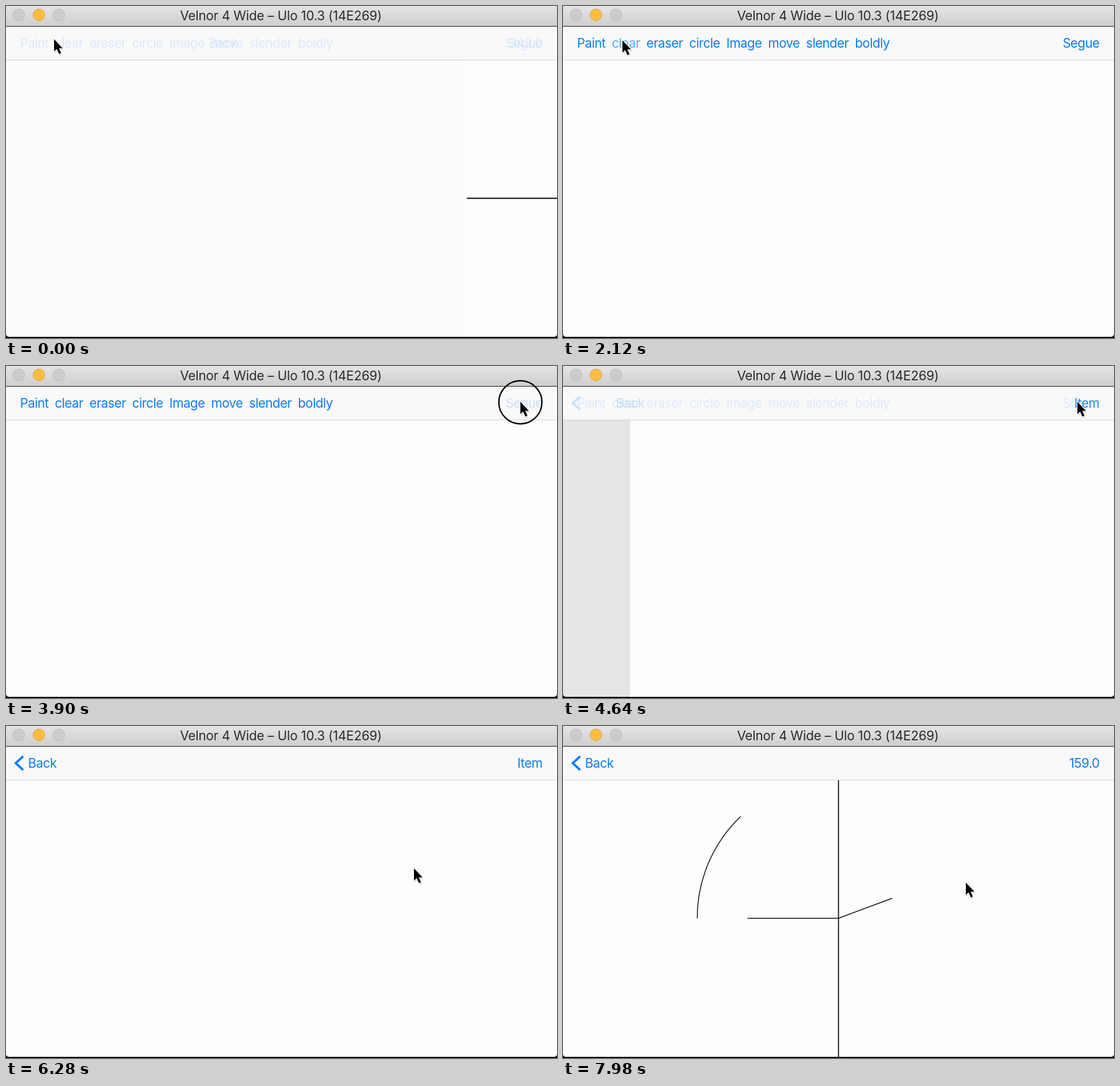
Write an HTML page that moves like this. It is 963 px wide and 581 px high and loops after 8000 ms.

```html
<!DOCTYPE html>
<html lang="en">
<head>
<meta charset="utf-8">
<title>Drawing app in a simulator</title>
<style>
  html, body { margin: 0; width: 100%; height: 100%; overflow: hidden; background: #000; }
  svg { display: block; width: 100vw; height: 100vh; }
  text { font: 22.3px Inter, Roboto, sans-serif; letter-spacing: -.56px; fill: #0c7df2; white-space: pre; }
  #title { font-size: 22.5px; letter-spacing: -.22px; fill: #2c2a2c; text-anchor: middle; }
  .right { text-anchor: end; }
  .ink { fill: none; stroke: #000; stroke-width: 1.4; }
</style>
</head>
<body>
<svg viewBox="0 0 963 581" preserveAspectRatio="none">
  <defs>
    <linearGradient id="chrome" x2="0" y2="1">
      <stop stop-color="#e5e3e5"/><stop offset="1" stop-color="#cfcdcf"/>
    </linearGradient>
    <clipPath id="window"><path d="M0 0H963V573Q963 579 957 579H6Q0 579 0 573Z"/></clipPath>
  </defs>
  <rect width="963" height="581"/>
  <g clip-path="url(#window)">
    <rect y="94" width="963" height="487" fill="#fdfdfd"/>
    <rect id="dim" y="94" width="963" height="487"/>
    <g id="page">
      <rect y="94" width="963" height="487" fill="#fdfdfd"/>
      <path id="oldLine" class="ink" style="stroke-width:2" d="M0 336.5H963"/>
      <g id="drawing" class="ink">
        <path d="M481.5 94V580" stroke-width="1.7"/>
        <path id="strokes"/>
      </g>
    </g>
    <rect y="36" width="963" height="58" fill="#f9f9fa"/>
    <path d="M0 94.5H963" stroke="#d0d0d6"/>
    <g id="tools"></g>
    <text id="segue" class="right" x="937.5" y="73">Segue</text>
    <path id="chevron" d="M30 53L17 65L30 77" fill="none" stroke="#0c7df2" stroke-width="3.8"/>
    <text id="back" y="73">Back</text>
    <text id="item" class="right" x="937.5" y="73"></text>
    <rect width="963" height="35" fill="url(#chrome)"/>
    <path d="M0 35.5H963" stroke="#111"/>
    <g stroke="#b4b2b4" fill="#cdcbcd">
      <circle cx="22.5" cy="15.5" r="10.2"/>
      <circle cx="57.5" cy="15.5" r="10.2" fill="#fdbd3e" stroke="#dfa13a"/>
      <circle cx="92.5" cy="15.5" r="10.2"/>
    </g>
    <text id="title" x="480.5" y="24.5">Velnor 4 Wide – Ulo 10.3 (14E269)</text>
    <g id="pointer">
      <circle id="ring" cy="1" r="37.7" fill="none" stroke="#000" stroke-width="2.4"/>
      <path d="M1 3V25L6 20.5L10 29L14 27L10.5 19H17Z" opacity=".14"/>
      <path d="M0 0V21.5L4.8 17.2L8.7 26L12.4 24.4L8.6 15.9H15Z" stroke="#fff" stroke-width="2.4" paint-order="stroke"/>
    </g>
  </g>
</svg>
<script>
const LOOP = 8000;
const POP_START = -417, PUSH_START = 4174;
const CLEAR_DOWN = 1280, CLEAR_UP = 1570;
const SEGUE_DOWN = 3560, SEGUE_UP = 4150;
const TAP_DOWN = 7360, TAP_UP = 7580;
const DRAW_START = 7600, DRAW_TIME = 380;
const CENTER = { x: 481.5, y: 336.5 };
const PRESSED = .2;

const $ = id => document.getElementById(id);
const fade = (el, alpha) => el.setAttribute('opacity', alpha);
const show = (el, on) => el.setAttribute('visibility', on ? 'inherit' : 'hidden');
const ramp = (t, from, to) => Math.min(1, Math.max(0, (t - from) / (to - from)));
const smooth = k => k * k * (3 - 2 * k);
const within = (t, from, to) => t >= from && t < to;

// Critically damped spring: 1 at the start, settling to 0.
function spring(ms) {
  const w = Math.max(0, ms) * .0078;
  return w > 9 ? 0 : (1 + w) * Math.exp(-w);
}

// Spread the toolbar labels evenly between the two ends.
function layTools(words, left, right) {
  const items = words.map(word => {
    const el = document.createElementNS('http://www.w3.org/2000/svg', 'text');
    el.textContent = word;
    el.setAttribute('y', 73);
    return $('tools').appendChild(el);
  });
  const widths = items.map(el => el.getComputedTextLength());
  const gap = (right - left - widths.reduce((a, b) => a + b)) / (items.length - 1);
  let x = left;
  items.forEach((el, i) => {
    el.setAttribute('x', x);
    x += widths[i] + gap;
  });
  return items;
}

// The pointer drifts onto "clear", then glides to "Segue" and over the canvas.
function pointerAt(t) {
  const drift = Math.exp(-t / 420);
  let x = 104 - 20 * drift, y = 60 - 2 * drift;
  const glide = (from, to, toX, toY) => {
    const k = smooth(ramp(t, from, to));
    x += (toX - x) * k;
    y += (toY - y) * k;
  };
  glide(2480, 3300, 899, 62.5);
  glide(5000, 5760, 713, 249);
  glide(TAP_UP, 7960, 704, 274);
  return [x, y];
}

function polar(radius, degrees) {
  const a = degrees * Math.PI / 180;
  return `${CENTER.x + radius * Math.cos(a)} ${CENTER.y - radius * Math.sin(a)}`;
}

function strokes(k) {
  return `M${polar(0, 0)}L${polar(159 * k, 180)}` +
    `M${polar(0, 0)}L${polar(100 * k, 20.5)}` +
    `M${polar(247, 180)}A247 247 0 0 1 ${polar(247, 180 - 46.2 * k)}`;
}

const tools = layTools(['Paint', 'clear', 'eraser', 'circle', 'Image', 'move', 'slender', 'boldly'], 24.5, 571);

function renderBar(t, popping, shift) {
  const toolAlpha = ramp(t, -65, 480) * (1 - ramp(t, PUSH_START, 4700));
  const leaving = 1 - ramp(t, POP_START, 55);
  const backAlpha = popping ? leaving : ramp(t, 4550, 5000);

  tools.forEach(el => fade(el, toolAlpha));
  if (t >= CLEAR_DOWN) fade(tools[1], toolAlpha * (PRESSED + (1 - PRESSED) * ramp(t, 1850, 2320)));
  fade($('segue'), t < SEGUE_DOWN ? toolAlpha : Math.min(PRESSED, toolAlpha));
  fade($('back'), backAlpha);
  fade($('chevron'), popping ? 0 : backAlpha);
  fade($('item'), popping ? leaving : ramp(t, 4250, 4690));
  $('back').setAttribute('x', 38.5 + shift * (popping ? 378 : 444));
  $('item').textContent = popping ? '343.0' : t < TAP_UP ? 'Item' : '159.0';
}

function render(t) {
  const popping = t < PUSH_START;
  const rest = spring(t - (popping ? POP_START : PUSH_START));
  const shift = popping ? 1 - rest : rest;

  $('page').setAttribute('transform', `translate(${963 * shift} 0)`);
  fade($('dim'), .12 * (1 - shift) ** 2);
  show($('oldLine'), popping);
  renderBar(t, popping, shift);

  show($('drawing'), t >= DRAW_START);
  $('strokes').setAttribute('d', strokes(ramp(t, DRAW_START, DRAW_START + DRAW_TIME)));

  $('pointer').setAttribute('transform', `translate(${pointerAt(t)})`);
  show($('ring'), within(t, CLEAR_DOWN, CLEAR_UP) ||
    within(t, SEGUE_DOWN, SEGUE_UP) || within(t, TAP_DOWN, TAP_UP));
}

const start = performance.now();
function tick(now) {
  render(Math.max(0, now - start) % LOOP);
  requestAnimationFrame(tick);
}
render(0);
requestAnimationFrame(tick);
</script>
</body>
</html>
```
